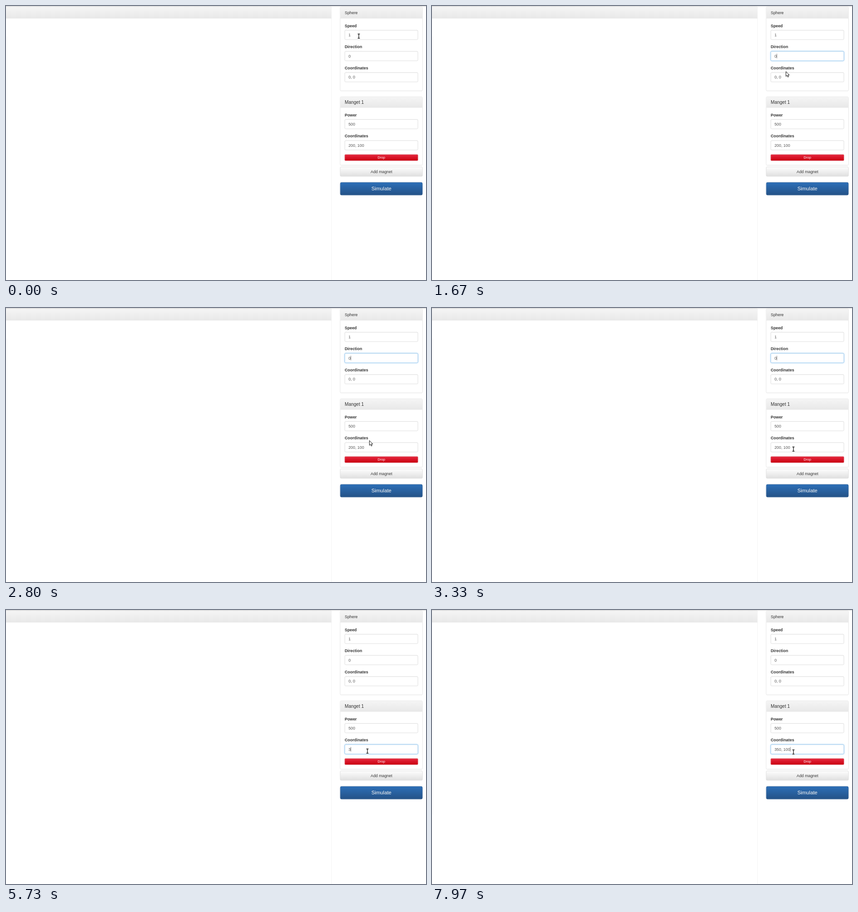
Write an HTML page that moves like this. It is 925 px wide and 605 px high and loops after 8000 ms.

```html
<!DOCTYPE html>
<html lang="en">
<head>
<meta charset="utf-8">
<title>Magnet simulation form</title>
<style>
html, body { margin: 0; width: 100%; height: 100%; overflow: hidden; background: #fff; }
* { box-sizing: border-box; }
#stage { position: relative; width: 100%; height: 100%; overflow: clip; contain: strict; }
#page {
  position: absolute; left: 0; top: 0; width: 1464.8px; height: 958px; overflow: clip;
  transform: scale(.6315); transform-origin: 0 0;
  font: 14px/20px "Liberation Sans", Arial, sans-serif; color: #333;
}
#topline { position: absolute; left: 0; top: 0; width: 100%; height: 2px; background: #d9d9d9; }
#shade { position: absolute; left: 0; top: 107px; width: 7px; height: 609px; background: #fdfdfd; }
.panel {
  background: #fff; border: 1px solid #ddd; border-radius: 4px;
  box-shadow: 0 1px 2px rgba(0,0,0,.05); margin-bottom: 20px;
}
#board {
  position: absolute; left: -20px; top: 2px; width: 1156px; height: 956px;
  margin: 0; border-bottom: 0; border-radius: 4px 4px 0 0;
}
.head {
  height: 41px; padding: 10px 15px; border-bottom: 1px solid #ddd;
  border-radius: 3px 3px 0 0; background: linear-gradient(#f5f5f5, #e8e8e8);
}
.title { height: 38px; font-size: 16px; line-height: 17px; }
.body { padding: 15px; }
aside { position: absolute; left: 1165.3px; top: 2.2px; width: 288px; }
label { display: block; font-weight: bold; margin-bottom: 5px; }
.field {
  --focus: 0;
  height: 34px; padding: 6px 12px; margin-bottom: 15px; border-radius: 4px;
  border: 1px solid color-mix(in srgb, #66afe9 calc(var(--focus) * 100%), #ccc);
  box-shadow: inset 0 1px 1px rgba(0,0,0,.075), 0 0 5px rgba(102,175,233,calc(var(--focus) * .6));
  color: #555; white-space: pre; background: #fff;
}
.caret { position: relative; }
.caret.on::before {
  content: ""; position: absolute; left: 0; top: 0; width: 1px; height: 16px; background: #333;
}
.selected { background: #3390ff; color: #fff; }
.btn { text-align: center; border: 1px solid; border-radius: 4px; }
.drop {
  height: 22px; font-size: 12px; line-height: 20px; border-radius: 3px; color: #fff;
  background: linear-gradient(#e5283c, #cb0012); border-color: #c50012;
}
.add {
  height: 34px; line-height: 32px; margin: -15px 0 20px; border-color: #ccc;
  background: linear-gradient(#fdfdfd, #e0e0e0); text-shadow: 0 1px 0 #fff;
}
.go {
  height: 46px; font-size: 18px; line-height: 44px; border-radius: 6px; color: #fff;
  background: linear-gradient(#2d6fb7, #245287); border-color: #245287;
  text-shadow: 0 -1px 0 rgba(0,0,0,.2);
}
#pointer { position: absolute; left: 0; top: 0; overflow: visible; }
</style>
</head>
<body>
<div id="stage">
  <div id="page">
    <div id="board" class="panel"><div class="head"></div></div>
    <div id="shade"></div>
    <div id="topline"></div>
    <aside>
      <div class="panel">
        <div class="head">Sphere</div>
        <div class="body">
          <label>Speed</label><div class="field" id="speed"></div>
          <label>Direction</label><div class="field" id="direction"></div>
          <label>Coordinates</label><div class="field" id="start"></div>
        </div>
      </div>
      <div class="panel">
        <div class="head title">Manget 1</div>
        <div class="body">
          <label>Power</label><div class="field" id="power"></div>
          <label>Coordinates</label><div class="field" id="place"></div>
          <div class="btn drop">Drop</div>
        </div>
      </div>
      <div class="btn add">Add magnet</div>
      <div class="btn go">Simulate</div>
    </aside>
  </div>
  <svg id="pointer" width="1" height="1">
    <path id="arrow" d="M0 0V10.6L2.5 8.4 4.1 12.2 5.9 11.4 4.3 7.7H7.4Z" fill="#fff" stroke="#111" stroke-width="1" stroke-linejoin="round"/>
    <g id="beam" fill="none">
      <path d="M-2.4-4.7H2.4M0-4.7V4.7M-2.4 4.7H2.4" stroke="#fff" stroke-width="2.4"/>
      <path d="M-2.4-4.7H2.4M0-4.7V4.7M-2.4 4.7H2.4" stroke="#222" stroke-width="1.4"/>
    </g>
  </svg>
</div>
<script>
const LOOP = 8000, FADE = 150;
const $ = id => document.getElementById(id);

// time, x, y of the pointer's hot spot
const path = [
  [0, 777, 66.5], [630, 777, 66.5], [830, 776, 91], [1170, 777, 111.5],
  [1500, 777, 111.5], [1670, 779.5, 144.5], [2130, 788, 256.5], [2270, 789, 265.5],
  [2600, 789, 265.5], [2900, 806, 306], [3030, 814, 324], [3330, 796, 311.5],
  [7969, 796, 311.5], [7970, 796, 313.5], [LOOP, 796, 313.5]
];

// focus span and the spans in which the blinking caret is hidden
const fields = [
  { id: "speed", text: "1", from: 600, to: 1500, hidden: [[1170, 1500]] },
  { id: "direction", text: "0", from: 1500, to: 3770, hidden: [[2200, 2800]] },
  { id: "start", text: "0, 0" },
  { id: "power", text: "500" },
  { id: "place", text: "200, 100", from: 3770, to: Infinity, hidden: [[4370, 5730]] }
];
const keyTimes = [5730, 5970, 6200, 6500, 6870, 7130, 7330, 7500];
const typed = "350, 100", selectTime = 4570;

for (const f of fields) {
  f.box = $(f.id);
  f.value = f.box.appendChild(document.createElement("span"));
  f.caret = f.box.appendChild(document.createElement("span"));
  f.caret.className = "caret";
}

const clamp = v => Math.max(0, Math.min(1, v));
const within = (v, [a, b]) => v >= a && v < b;

function pointerAt(t) {
  const i = path.findIndex(p => p[0] > t);
  const [t0, x0, y0] = path[i - 1], [t1, x1, y1] = path[i];
  const k = (t - t0) / (t1 - t0);
  return [x0 + (x1 - x0) * k, y0 + (y1 - y0) * k];
}

function draw(t) {
  const keys = keyTimes.filter(k => k <= t).length;
  for (const f of fields) {
    const isPlace = f.id === "place";
    f.value.textContent = isPlace && keys ? typed.slice(0, keys) : f.text;
    f.value.className = isPlace && t >= selectTime && !keys ? "selected" : "";
    if (f.from === undefined) continue;
    const focus = clamp((t - f.from) / FADE) - clamp((t - f.to) / FADE);
    f.box.style.setProperty("--focus", focus.toFixed(3));
    const shown = within(t, [f.from, f.to]) && !f.hidden.some(h => within(t, h));
    f.caret.classList.toggle("on", shown);
  }
  const [x, y] = pointerAt(t);
  const overText = [53, 100, 147, 250, 297].some(top => within(y, [top, top + 21.7]));
  $("beam").style.display = overText ? "" : "none";
  $("arrow").style.display = overText ? "none" : "";
  $("pointer").style.transform = `translate(${x}px, ${y}px)`;
}

const begin = performance.now();
function tick() {
  draw((performance.now() - begin) % LOOP);
  requestAnimationFrame(tick);
}
tick();
</script>
</body>
</html>
```
